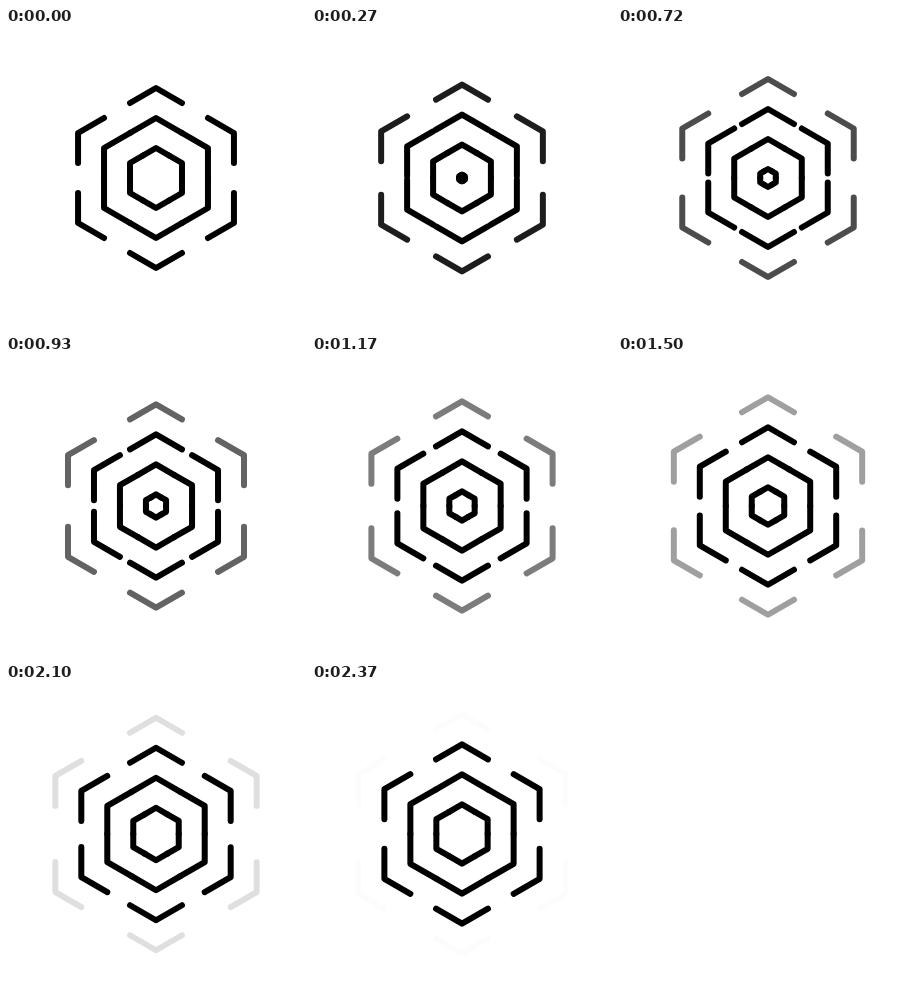
Recreate the animation shown at these times as an HTML page with a canvas. Size 300 by 300 pixels, loop 2400 ms.

```html
<!DOCTYPE html>
<html>
<head>
<meta charset="utf-8">
<style>
  html, body { margin: 0; height: 100%; overflow: hidden; background: #fff; }
  canvas { display: block; }
</style>
</head>
<body>
<canvas id="stage" width="300" height="300"></canvas>
<script>
const LOOP = 2400, STEP = 30, SPACING = 30, RINGS = 4, MAX_ARM = 30;
const ctx = document.getElementById('stage').getContext('2d');
ctx.lineWidth = 6;
ctx.lineCap = ctx.lineJoin = 'round';

// Six corner pieces; they separate once their arms reach full length.
function drawRing(radius, alpha) {
  const arm = Math.min(radius / 2, MAX_ARM);
  const dx = arm * Math.sqrt(3) / 2, dy = arm / 2;
  ctx.globalAlpha = alpha;
  for (let i = 0; i < 6; i++) {
    ctx.save();
    ctx.translate(150, 150);
    ctx.rotate(i * Math.PI / 3);
    ctx.beginPath();
    ctx.moveTo(-dx, dy - radius);
    ctx.lineTo(0, -radius);
    ctx.lineTo(dx, dy - radius);
    ctx.stroke();
    ctx.restore();
  }
}

function draw(now) {
  const progress = Math.floor(now % LOOP / STEP) * STEP / LOOP;
  ctx.clearRect(0, 0, 300, 300);
  for (let ring = 0; ring < RINGS; ring++) {
    const radius = (ring + progress) * SPACING;
    if (radius > 0) drawRing(radius, ring === RINGS - 1 ? 1 - progress : 1);
  }
  requestAnimationFrame(draw);
}
draw(0);
</script>
</body>
</html>
```
